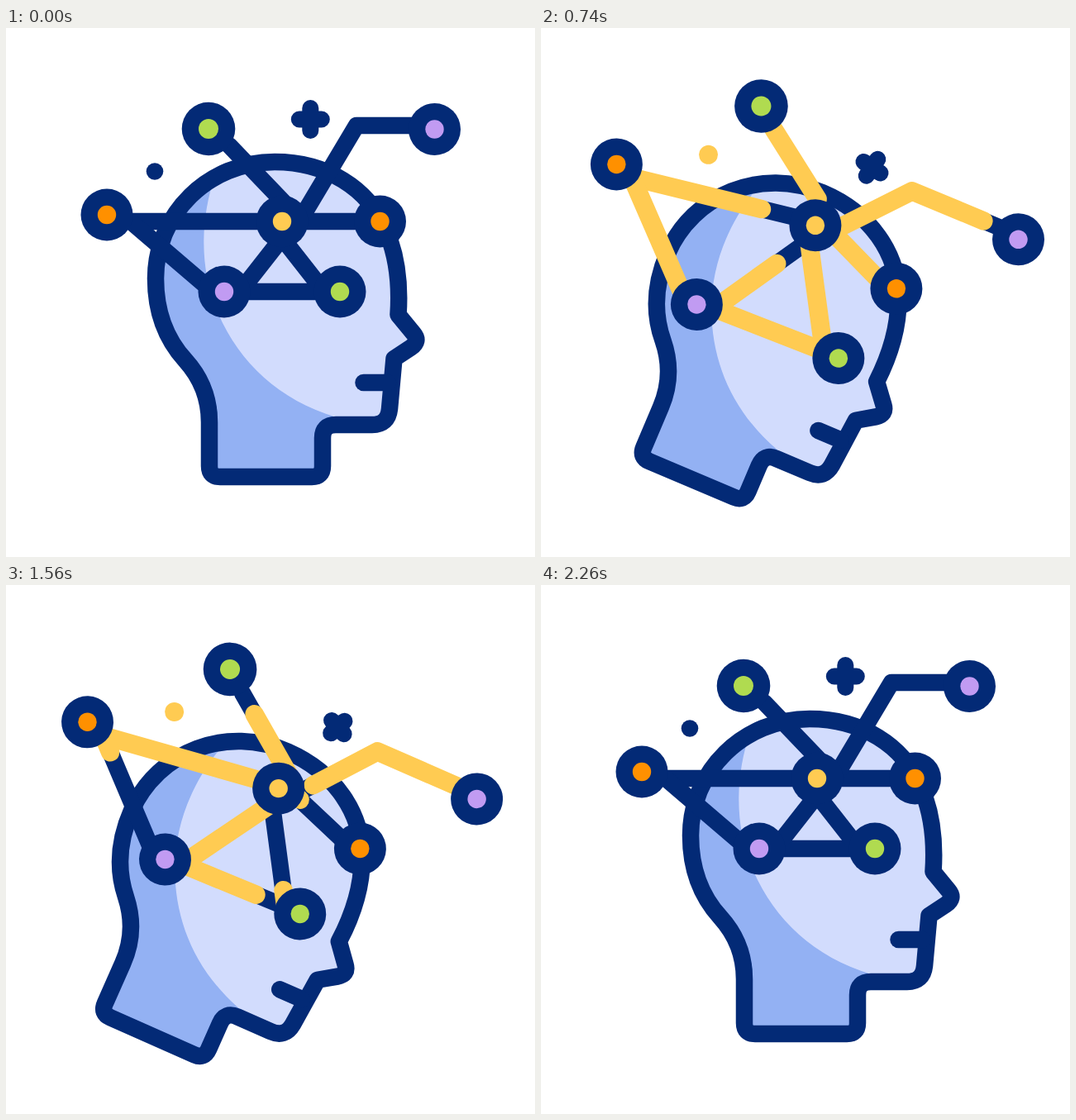
These frames come from a looping animation (640 px wide and 640 px high, 2.4 s). An HTML page:

```html
<!DOCTYPE html>
<html lang="en">
<head>
<meta charset="utf-8">
<title>Thinking head</title>
<style>
html, body { margin: 0; width: 100%; height: 100%; overflow: hidden; background: #fff; }
svg { display: block; width: 100vw; height: 100vh; }
.line { fill: none; stroke: #032a76; stroke-width: 20.5; stroke-linecap: round; stroke-linejoin: round; }
.glow { stroke: #ffcb52; stroke-width: 22.5; }
</style>
</head>
<body>
<svg viewBox="0 0 640 640">
  <defs>
    <path id="skull" d="M246 477V530Q246 543 259 543H370Q383 543 383 530V496Q383 480 399 480H443Q462 480 464 461L469.5 400L490 386.5Q501 379 493 369.5L474.5 347C477 310 473 274 459 243C438 194 388 162 325 162C245 162 181 225 181 303C181 345 195 378 217 402C236 423 246 449 246 477Z"/>
    <clipPath id="inside"><use href="#skull"/></clipPath>
  </defs>
  <g id="rig">
    <use href="#skull" fill="#d2dcfd"/>
    <path clip-path="url(#inside)" fill="#93b1f3" d="M254 175C233 235 235 296 257 346C283 405 330 450 400 471V560H150V150H254Z"/>
    <use href="#skull" class="line"/>
    <path class="line" d="M432.5 429H462"/>
    <g id="wires"></g>
    <g id="glows"></g>
    <g id="nodes"></g>
    <circle cx="180" cy="173.5" r="10.3" fill="#032a76"/>
    <circle id="dot" cx="180" cy="173.5" fill="#ffcb52"/>
    <path id="plus" class="line" style="stroke-width:20"/>
  </g>
</svg>
<script>
const LOOP = 2400, PEAK = 1080, END = 2260;
const DARK = '#032a76', ORANGE = '#ff9000', GREEN = '#b0db50', LILAC = '#c19bf2', YELLOW = '#ffcb52';
const $ = id => document.getElementById(id);

function make(parent, tag, attrs) {
  const el = document.createElementNS('http://www.w3.org/2000/svg', tag);
  for (const k in attrs) el.setAttribute(k, attrs[k]);
  return $(parent).appendChild(el);
}

const ramp = (t, a, b) => Math.min(1, Math.max(0, (t - a) / (b - a)));
const smooth = u => u * u * (3 - 2 * u);
const cubic = u => u < .5 ? 4 * u ** 3 : 1 - 4 * (1 - u) ** 3;
const swing = (ease, t, from, peak, end) => ease(ramp(t, from, peak)) - ease(ramp(t, peak, end));

// Rest position, drift at full spread, colour
const nodes = {
  crown:  { x: 245, y: 122, dx: -38, dy: -36, color: GREEN, big: 1 },
  back:   { x: 122, y: 226, dx: -52, dy: 2, color: ORANGE },
  hub:    { x: 334, y: 234, dx: -2, dy: -42, color: YELLOW },
  brow:   { x: 452.5, y: 234, dx: 0, dy: 0, color: ORANGE },
  ear:    { x: 264, y: 319, dx: -34.5, dy: 35, color: LILAC },
  eye:    { x: 404, y: 319, dx: 22, dy: 26, color: GREEN },
  far:    { x: 518.5, y: 122.5, dx: 61, dy: -1, color: LILAC }
};
for (const n of Object.values(nodes)) {
  n.el = make('nodes', 'g', {});
  for (const [r, fill] of [[31.5, DARK], [11.2, n.color]]) {
    const c = make('nodes', 'circle', { r: r + (n.big || 0) * .8, fill });
    n.el.appendChild(c);
  }
}

// Points are [x, y] or [node, offset x, y, extra drift x, y]; then the times to light up and to go dark
const corner = ['back', 29, 8, -7.5, -1];
const wires = [
  { pts: [corner, ['hub', 0, 0, 0, -5]], on: [460, 900], off: [1550, 1990] },
  { pts: [['ear', -16, -2, -1, 1], corner], on: [0, 440], off: [1240, 1660] },
  { pts: [['brow', -20, 0], ['hub', 20, 0, 0, -2]], on: [0, 440], off: [1230, 1650] },
  { pts: [['crown', 25, 20], ['hub', 5, -20]], on: [200, 920], off: [1340, 2000] },
  { pts: [['eye', 0, 0, 0, -2], ['ear', 0, 0, 0, -4]], on: [260, 800], off: [1380, 1850] },
  { pts: [['ear', 19, 0], ['hub', 0, 20]], on: [470, 910], off: [1640, 2080] },
  { pts: [['hub', 0, 20], ['eye', -19, 0]], on: [0, 440], off: [1250, 1670] },
  { pts: [['hub', 22, -2], [424, 118], ['far', -20, -4.5]], on: [340, 852], off: [1460, 1960] }
];
for (const w of wires) {
  w.base = make('wires', 'path', { class: 'line' });
  w.glow = make('glows', 'path', { class: 'line glow', pathLength: 1 });
}

function place([a, b, c, ex = 0, ey = 0], q) {
  if (typeof a === 'number') return a + ' ' + b;
  const n = nodes[a];
  return (n.x + b + (n.dx + ex) * q) + ' ' + (n.y + c + (n.dy + ey) * q);
}

function draw(t) {
  const tilt = swing(cubic, t, 20, 1180, 2240);
  const spread = swing(smooth, t, 0, PEAK, END);
  const spin = swing(cubic, t, 0, PEAK, END);

  $('rig').setAttribute('transform',
    `translate(${-120 * tilt} ${14 * tilt}) rotate(${29.3 * tilt} 315 445)`);

  for (const id in nodes) nodes[id].el.setAttribute('transform', `translate(${place([id, 0, 0], spread)})`);

  for (const w of wires) {
    const d = 'M' + w.pts.map(p => place(p, spread)).join('L');
    const tail = smooth(ramp(t, ...w.off)), len = smooth(ramp(t, ...w.on)) - tail;
    w.base.setAttribute('d', d);
    w.glow.setAttribute('d', d);
    w.glow.setAttribute('stroke-dasharray', `${Math.max(len, 0)} 3`);
    w.glow.setAttribute('stroke-dashoffset', -tail);
    w.glow.setAttribute('visibility', len > .002 ? 'visible' : 'hidden');
  }

  $('dot').setAttribute('r', 11.5 * (smooth(ramp(t, 200, 360)) - smooth(ramp(t, 1900, 2060))));

  const arm = 13.5 * (1 - .96 * spin * (1 - spin));
  $('plus').setAttribute('d', `M${-arm} 0H${arm}M0 ${-arm}V${arm}`);
  $('plus').setAttribute('transform', `translate(368.3 110.5) rotate(${-90 * spin})`);
}

function tick(now) {
  draw(now % LOOP);
  requestAnimationFrame(tick);
}
draw(0);
requestAnimationFrame(tick);
</script>
</body>
</html>
```
